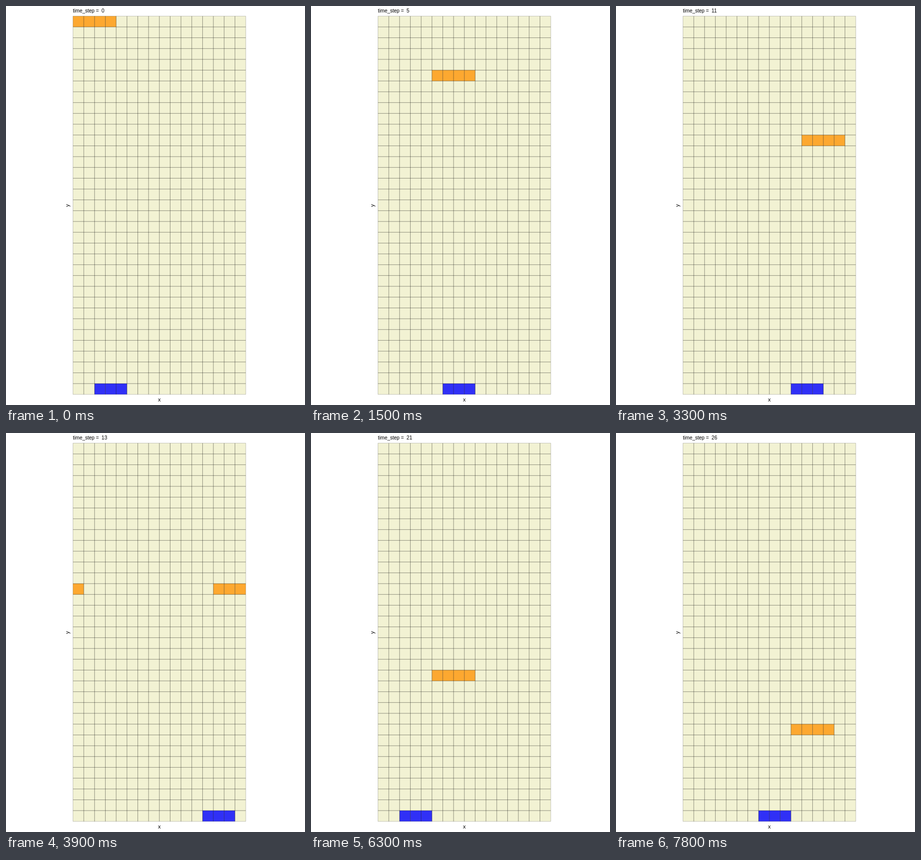
An HTML page with a canvas that plays this animation: 600x800 px, repeating every 8 s.

```html
<!DOCTYPE html>
<html lang="en">
<head>
<meta charset="utf-8">
<title>Grid steps</title>
<style>
  html, body { margin: 0; width: 100%; height: 100%; overflow: hidden; background: #fff; }
  canvas { display: block; }
</style>
</head>
<body>
<canvas id="stage" width="600" height="800"></canvas>
<script>
const ctx = document.getElementById('stage').getContext('2d');
const COLS = 16, ROWS = 35, CELL = 21.67, LEFT = 134.4, TOP = 20.3;
const STEP = 300, LOOP = 8000;
const FONT = '"Liberation Sans", Arial, sans-serif';
const PAUSES = [3, 7, 10, 18, 20]; // steps in which the blue bar stays put

function bar(col, row, length, color) {
  ctx.fillStyle = color;
  for (let i = 0; i < length; i++) {
    ctx.fillRect(LEFT + (col + i) % COLS * CELL, TOP + row * CELL, CELL, CELL);
  }
}

function grid() {
  const right = LEFT + COLS * CELL, bottom = TOP + ROWS * CELL;
  const line = (x1, y1, x2, y2, edge) => {
    ctx.strokeStyle = `rgba(0, 0, 0, ${edge ? 0.24 : 0.46})`;
    ctx.beginPath();
    ctx.moveTo(x1, y1);
    ctx.lineTo(x2, y2);
    ctx.stroke();
  };
  ctx.lineWidth = 0.9;
  for (let i = 0; i <= COLS; i++) {
    const x = LEFT + i * CELL;
    line(x, TOP, x, bottom, i % COLS === 0);
  }
  for (let i = 0; i <= ROWS; i++) {
    const y = TOP + i * CELL;
    line(LEFT, y, right, y, i % ROWS === 0);
  }
}

function label(text, x, y, size, align, angle = 0) {
  ctx.save();
  ctx.translate(x, y);
  ctx.rotate(angle);
  ctx.font = `${size}px ${FONT}`;
  ctx.textAlign = align;
  ctx.fillStyle = '#000';
  ctx.fillText(text, 0, 0);
  ctx.restore();
}

function draw(step) {
  ctx.fillStyle = '#fff';
  ctx.fillRect(0, 0, 600, 800);
  ctx.fillStyle = '#f2f2d3';
  ctx.fillRect(LEFT, TOP, COLS * CELL, ROWS * CELL);

  const rests = PAUSES.filter(p => p <= step).length;
  bar(step, step, 4, '#fda830');
  bar(2 + step - rests, ROWS - 1, 3, '#3030f6');
  grid();

  label('time_step =  ' + step, 134.3, 13, 10, 'left');
  label('x', 307.8, 793, 11, 'center');
  label('y', 126.5, 400, 11, 'center', -Math.PI / 2);
}

const start = performance.now();
function tick() {
  const t = (performance.now() - start) % LOOP;
  draw(Math.floor(t / STEP));
  requestAnimationFrame(tick);
}
tick();
</script>
</body>
</html>
```
